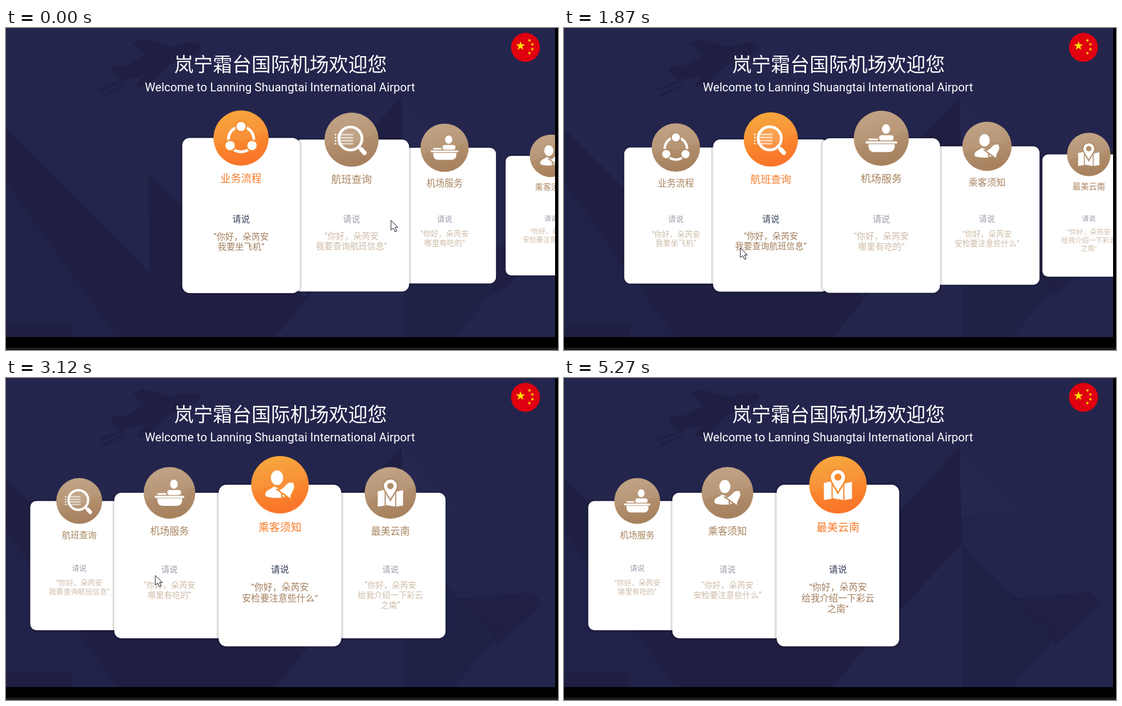
Recreate the animation shown at these times as an HTML page. Size 942 by 549 pixels, loop 5950 ms.

```html
<!DOCTYPE html>
<html lang="zh-CN">
<head>
<meta charset="utf-8">
<title>Airport service carousel</title>
<style>
html, body { margin: 0; width: 100%; height: 100%; overflow: hidden; background: #000; }
svg { display: block; width: 942px; height: 549px; }
text { font-family: Roboto, 'Noto Sans CJK SC', 'Noto Sans CJK', sans-serif; text-anchor: middle; }
.head { fill: #fff; }
.disc { fill: url(#cool); }
.title { font-size: 18.4px; fill: #a9845f; }
.label { font-size: 15.5px; font-weight: 500; fill: #9a9eac; }
.say { font-family: Roboto, 'Noto Sans CJK TC', 'Noto Sans CJK', sans-serif; font-size: 15.5px; fill: #cdbaa6; }
.icon { fill: #fff; --gap: #b08d6b; }
.gap { stroke: var(--gap); stroke-width: 2.5; }
.hole { fill: var(--gap); }
.on .disc { fill: url(#hot); }
.on .title { fill: #f77c2b; }
.on .label { fill: #35405c; }
.on .say { fill: #a27e5c; }
.on .icon { --gap: #f98a2d; }
</style>
</head>
<body>
<svg viewBox="0 0 942 549">
  <defs>
    <linearGradient id="hot" x2=".2" y2="1"><stop stop-color="#f6a632"/><stop offset="1" stop-color="#fa752a"/></linearGradient>
    <linearGradient id="cool" x2=".2" y2="1"><stop stop-color="#bfa182"/><stop offset="1" stop-color="#a8825f"/></linearGradient>
  </defs>
  <rect width="937" height="527" fill="#24254d"/>
  <path d="M0 262L190 527H0Z" fill="#21224a"/>
  <path d="M675 118L773 227L676 236Z" fill="#262751"/>
  <g fill="#1f1e43">
    <path d="M0 171L246 418L242 247L335 340L400 400L514 460L460 527H190L0 262Z"/>
    <path d="M675 118L560 240L500 330L514 460L679 282Z"/>
    <path d="M0 503H113V527H0Z"/>
    <path d="M679 282V527H765L850 430L800 402Z" opacity=".6"/>
    <path d="M768 376L898 365L916 384L895 405L838 456L822 430L790 402Z" opacity=".7"/>
    <path d="M178 70Q186 61 203 65L238 47L216 27L234 19L283 33Q315 20 332 29Q334 38 318 46L276 64L240 101L222 100L238 78Q204 91 190 86Z"/>
    <path d="M157 104L202 86L203 91L160 109ZM163 113L203 95V99L166 118Z" opacity=".7"/>
  </g>
  <text class="head" x="468.5" y="73.5" font-size="33" font-weight="500">岚宁霜台国际机场欢迎您</text>
  <text class="head" x="467.5" y="108" font-size="20.1">Welcome to Lanning Shuangtai International Airport</text>
  <circle cx="886.5" cy="33" r="24.7" fill="#e0000f"/>
  <path id="stars" fill="#fde000"/>
  <g id="deck"></g>
  <path d="M937 0H942V549H0V527H937Z"/>
  <path d="M0 545H942V549H0Z" fill="#1e1c1d"/>
  <path id="cursor" d="M0 0V16.5L4 13L7 19.5L9.8 18.3L7 12H12Z" fill="#fff" stroke="#15152c"/>
</svg>
<script>
const LOOP = 5950, CURSOR_GONE = 5270;
const $ = id => document.getElementById(id);

const dot = (x, y, r, more = '') => `<circle cx="${x}" cy="${y}" r="${r}" ${more}/>`;
const oval = (x, y, rx, ry) => `<ellipse cx="${x}" cy="${y}" rx="${rx}" ry="${ry}"/>`;
const bar = (x, y, w, h, r = 1) => `<rect x="${x}" y="${y}" width="${w}" height="${h}" rx="${r}"/>`;
const path = (d, more = '') => `<path d="${d}" ${more}/>`;
const text = (kind, y, s) => `<text class="${kind}" y="${y}">${s}</text>`;
const gap = 'class="gap"';

// Drawn around the centre of a disc of radius 49.
const icons = {
  ring: dot(0, 2, 22.5, 'fill="none" stroke="#fff" stroke-width="5"') +
    [0, 120, 240].map(a => `<g transform="rotate(${a} 0 2)">${dot(0, -20.5, 9.5, gap)}</g>`).join(''),
  lens: dot(-2, -2, 21, 'fill="#fff" fill-opacity=".12" stroke="#fff" stroke-width="5"') +
    path('M13 13L18 18', 'stroke="#fff" stroke-width="5"') +
    path('M18 18L23.5 24', 'stroke="#fff" stroke-width="8" stroke-linecap="round"') +
    [0, 1, 2, 3].map(i => {
      const y = -9 + i * 5.5;
      return dot(-29, y, 1.5) + `<g opacity=".6">${bar(-25, y - 1.5, 28, 3)}</g>`;
    }).join(''),
  desk: oval(8.4, -16.5, 7.3, 8.5) + bar(-4, -5.5, 26, 9.5, 4.5) + bar(-23, .5, 17, 3.2) + bar(-28, 5.5, 56, 4) +
    path('M-23 10.5H24V15Q23 24.5 14 24.5H-13Q-22 24.5 -23 15Z'),
  bell: oval(-5, -12, 10.5, 12.5) +
    path('M-25 17C-25 8 -14 8 -11 3L0 7L8 21Q-5 24 -20 21Q-25 20 -25 17Z') +
    `<g transform="translate(14 8) rotate(36)">${dot(0, 12, 4, gap)}${
      path('M-15 11C-10 7 -10 4 -9 -3Q-8 -12 -2.5 -14A2.6 2.6 0 0 1 2.5 -14Q8 -12 9 -3C10 4 10 7 15 11Z', gap)}</g>`,
  map: path('M-24 -3L-11 -6V24L-24 26ZM-9 -6L9 -2V26L-9 23ZM11 -2L24 -5V24L11 26Z') +
    path('M0 14C-4 5 -13.5 -4 -13.5 -13A13.5 13.5 0 0 1 13.5 -13C13.5 -4 4 5 0 14Z', gap) +
    dot(0, -13, 6, 'class="hole"')
};

const cards = [
  ['ring', '业务流程', '我要坐飞机”'],
  ['lens', '航班查询', '我要查询航班信息”'],
  ['desk', '机场服务', '哪里有吃的”'],
  ['bell', '乘客须知', '安检要注意些什么”'],
  ['map', '最美云南', '给我介绍一下彩云', '之南”']
].map(([icon, title, ...lines]) => {
  const card = document.createElementNS('http://www.w3.org/2000/svg', 'g');
  card.innerHTML =
    `<rect x="-104.5" y="-137.7" width="209" height="275.4" rx="13" fill="#fff"
      stroke="#000" stroke-opacity=".13" stroke-width="7" paint-order="stroke"/>` +
    `<g transform="translate(0 -137.7)">${dot(0, 0, 49, 'class="disc"')}${
      path('M-47 14L-20 3L4 6L47.5 -12A49 49 0 0 0 -47 14', 'fill="#fff" opacity=".05"')
    }<g class="icon">${icons[icon]}</g></g>` +
    text('title', -59, title) + text('label', 12, '请说') +
    ['“你好，朵芮安', ...lines].map((s, n) => text('say', 42.5 + n * 18.6, s)).join('');
  return card;
});

function star(x, y, r, turn = 0) {
  const points = Array.from({ length: 10 }, (_, i) => {
    const a = turn + i * Math.PI / 5, k = i % 2 ? r * .39 : r;
    return `${x + k * Math.sin(a)} ${y - k * Math.cos(a)}`;
  });
  return `M${points.join('L')}Z`;
}
// The small stars sit on an arc to the right of the large one.
$('stars').setAttribute('d', star(878, 30.5, 8.3) + [-1.5, -.5, .5, 1.5].map(i =>
  star(886 + 13 * Math.cos(i * .65), 32 + 13 * Math.sin(i * .65), 3.2, i * .3)).join(''));

const smooth = k => k * k * (3 - 2 * k);

// Eased value between key poses, each of which starts with its time.
function pose(keys, time) {
  const n = keys.findIndex(key => key[0] > time);
  const a = keys[n - 1], b = keys[n];
  const k = smooth((time - a[0]) / (b[0] - a[0]));
  return a.slice(1).map((v, i) => v + (b[i + 1] - v) * k);
}

// Swipes and rests: time, index of the card in front.
const swipes = [[0, .4], [150, .4], [400, 0], [850, 0], [1150, 1], [1600, 1], [2150, 2.17], [2350, 2.17],
  [2860, 3], [3200, 3], [3530, 4], [3690, 4], [4250, 0], [4350, 0], [4600, 4], [LOOP, 4]];

// Time, x and y.
const pointer = [[0, 657, 328], [820, 646, 340], [1870, 301, 375], [2720, 247, 348], [3530, 263, 325],
  [4300, 729, 343], [LOOP, 380, 497]];

// Pixels from the centre for a card that is d cards away.
const spread = d => 188.5 * smooth(Math.min(d, 1)) + 154 * Math.max(d - 1, 0) + 46 * Math.max(d - 2, 0);

function frame() {
  const time = performance.now() % LOOP;
  const [front] = pose(swipes, time), [x, y] = pose(pointer, time);
  const active = Math.round(front - .1);
  const far = i => Math.abs(i - front);
  cards.forEach((card, i) => {
    const cx = 467.5 + Math.sign(i - front) * spread(far(i));
    card.setAttribute('transform', `translate(${cx} 319.8) scale(${1 - far(i) / 10})`);
    card.setAttribute('class', i === active ? 'on' : '');
  });
  const order = [...cards.keys()].sort((a, b) => far(b) - far(a));
  $('deck').append(...order.map(i => cards[i]));
  $('cursor').setAttribute('transform', `translate(${x} ${y})`);
  $('cursor').setAttribute('visibility', time < CURSOR_GONE ? 'visible' : 'hidden');
  requestAnimationFrame(frame);
}
frame();
</script>
</body>
</html>
```
